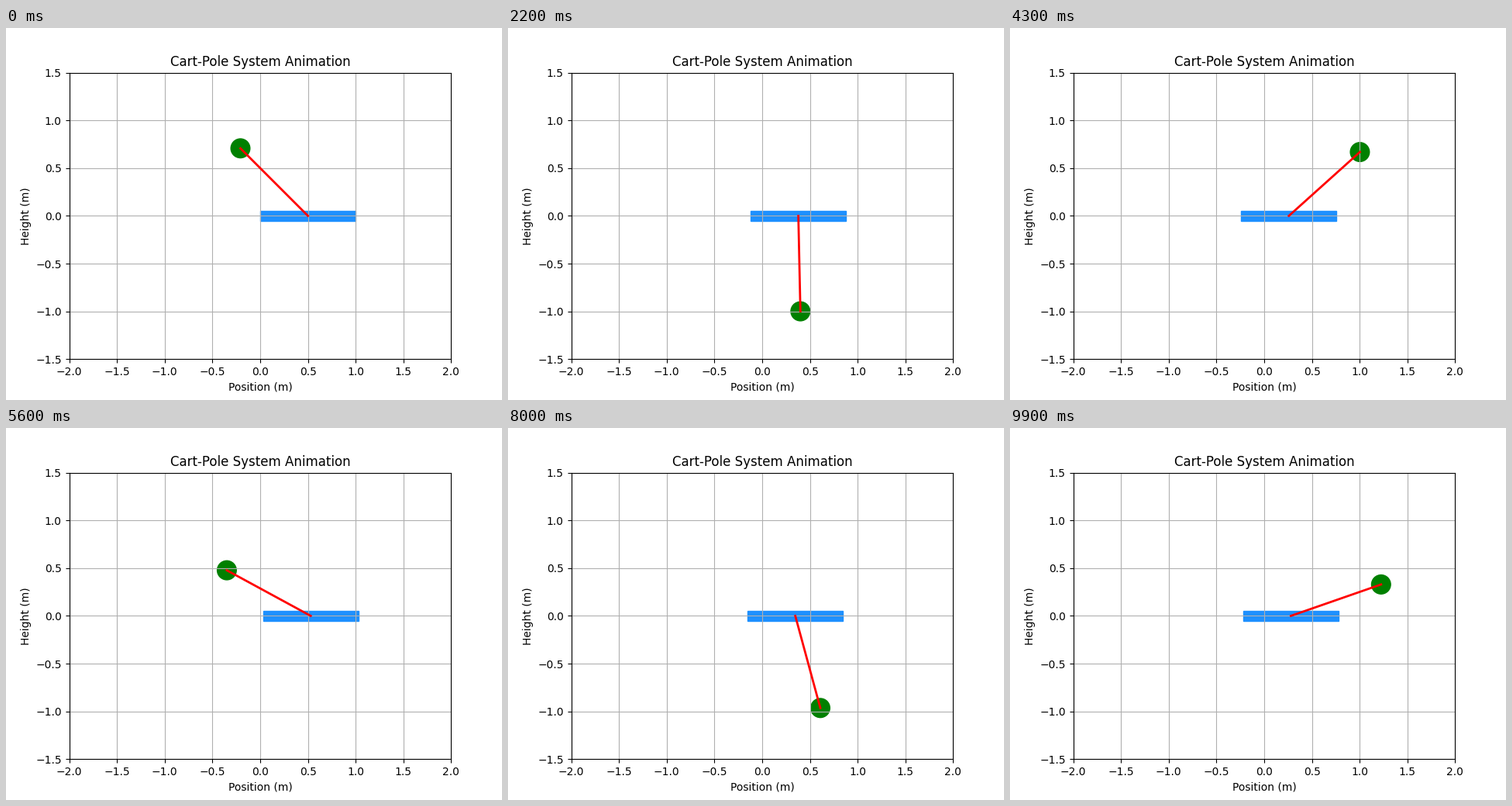
A matplotlib script that plays this animation: 640 by 480 pixels, repeating every 10 s.

```python
import numpy as np
import matplotlib.pyplot as plt
from matplotlib.animation import FuncAnimation
from matplotlib.patches import Circle, Rectangle

FRAMES, DURATION = 100, 10.0
G, LENGTH = 9.81, 1.0
MASS_RATIO = 1 / 6        # pole mass / total mass
FRICTION = 0.00176        # slow energy loss at the joint
CART_W, CART_H, BALL_R = 1.0, 0.1, 0.1
X0, PHI0 = 0.5, -0.75 * np.pi   # angle is measured from straight down


def slope(state):
    phi, omega = state
    s, c = np.sin(phi), np.cos(phi)
    torque = -G / LENGTH * s - MASS_RATIO * s * c * omega**2 - FRICTION * omega
    return np.array([omega, torque / (1 - MASS_RATIO * c * c)])


def rk4(state, h):
    k1 = slope(state)
    k2 = slope(state + h / 2 * k1)
    k3 = slope(state + h / 2 * k2)
    k4 = slope(state + h * k3)
    return state + h / 6 * (k1 + 2 * k2 + 2 * k3 + k4)


def simulate(times, substeps=20):
    state = np.array([PHI0, 0.0])
    angles = [PHI0]
    for h in np.diff(times):
        for _ in range(substeps):
            state = rk4(state, h / substeps)
        angles.append(state[0])
    return np.array(angles)


times = np.linspace(0, DURATION, FRAMES)
phi = simulate(times)
# The centre of mass stays put except for a late drift.
drift = 0.055 * (times / DURATION) ** 9
cart_x = X0 - MASS_RATIO * LENGTH * (np.sin(phi) - np.sin(PHI0)) + drift
ball_x = cart_x + LENGTH * np.sin(phi)
ball_y = -LENGTH * np.cos(phi)

fig, ax = plt.subplots(figsize=(6.4, 4.8), dpi=100)
ax.set_xlim(-2, 2)
ax.set_ylim(-1.5, 1.5)
ax.set_aspect("equal")
ax.set_xlabel("Position (m)")
ax.set_ylabel("Height (m)")
ax.set_title("Cart-Pole System Animation")
ax.grid(True)

cart = ax.add_patch(Rectangle((0, -CART_H / 2), CART_W, CART_H, color="dodgerblue"))
ball = ax.add_patch(Circle((0, 0), BALL_R, color="green"))
pole, = ax.plot([], [], color="red", lw=2)


def update(i):
    cart.set_x(cart_x[i] - CART_W / 2)
    ball.center = ball_x[i], ball_y[i]
    pole.set_data([cart_x[i], ball_x[i]], [0, ball_y[i]])
    return cart, ball, pole


def init():
    return update(0)


anim = FuncAnimation(fig, update, frames=FRAMES, init_func=init,
                     interval=100, repeat=True, repeat_delay=0, blit=False)
plt.show()
```
